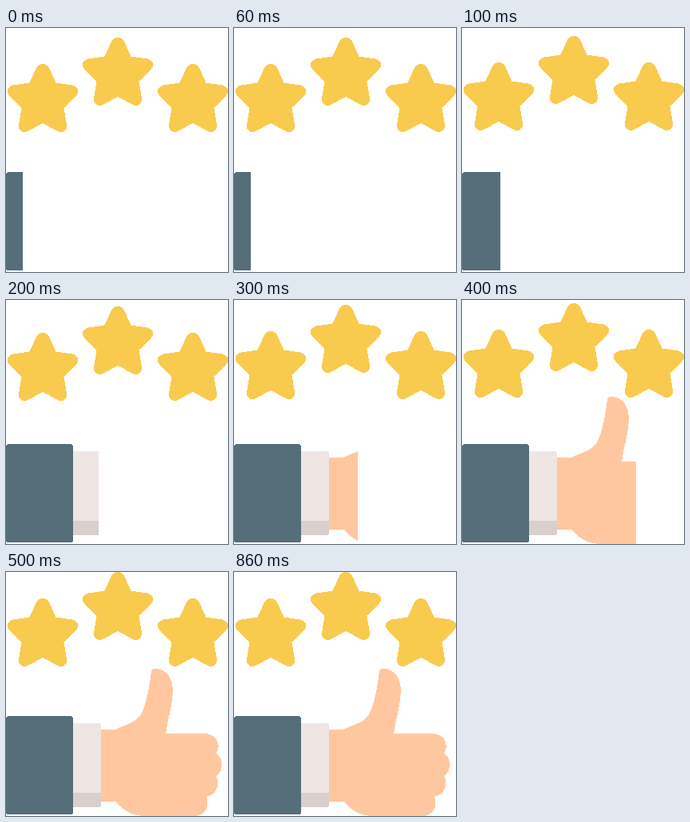
Recreate the animation shown at these times as an HTML page. Size 278x305 px, loop 1.1 s.

```html
<!DOCTYPE html>
<html lang="en">
<head>
<meta charset="utf-8">
<title>Three stars, thumbs up</title>
<style>
  html, body {
    margin: 0;
    width: 100%;
    height: 100%;
    overflow: hidden;
    background: #fff;
  }

  svg {
    position: absolute;
    left: 0;
    top: 0;
    width: 278px;
    height: 305px;
    overflow: hidden;
    shape-rendering: crispEdges;
  }

  .stars {
    fill: #f8cb4f;
    animation: rise 1100ms step-end infinite;
  }

  .arm {
    animation: reveal 1100ms step-end infinite;
  }

  .sleeve { fill: #556e7a; }
  .cuff   { fill: #efe6e3; }
  .shade  { fill: #d9cfcd; }
  .hand   { fill: #ffc7a0; }

  /* Both moves advance in 100 ms steps, then rest for 600 ms. */
  @keyframes rise {
    0%       { transform: translateY(12px); }
    9.0909%  { transform: translateY(10px); }
    18.1818% { transform: translateY(8px); }
    27.2727% { transform: translateY(6px); }
    36.3636% { transform: translateY(4px); }
    45.4545%, 100% { transform: translateY(0); }
  }

  @keyframes reveal {
    0%       { clip-path: inset(0 257px 0 0); }
    9.0909%  { clip-path: inset(0 230px 0 0); }
    18.1818% { clip-path: inset(0 162px 0 0); }
    27.2727% { clip-path: inset(0 123px 0 0); }
    36.3636% { clip-path: inset(0 60px 0 0); }
    45.4545%, 100% { clip-path: inset(0); }
  }
</style>
</head>
<body>
<svg viewBox="0 0 278 305">
  <defs>
    <path id="star" d="M0 0C4 0 6.5 2 8 5L16.5 23.5L37 26.5C44 27.5 46.5 35 41.5 40L26.5 54.5L30 76C31 83 25 87 19 84L0 74
      L-19 84C-25 87 -31 83 -30 76L-26.5 54.5L-41.5 40C-46.5 35 -44 27.5 -37 26.5L-16.5 23.5L-8 5C-6.5 2 -4 0 0 0Z"/>
  </defs>
  <g class="stars">
    <use href="#star" x="46" y="33"/>
    <use href="#star" x="140" y="0"/>
    <use href="#star" x="234" y="33"/>
  </g>
</svg>

<svg class="arm" viewBox="0 0 278 305">
  <path class="hand" d="M118 197H137C144 193 157 190 164 184C174 176 178 152 182 125Q182 121 187 121
    C201 121 209 133 209 149C209 164 202 186 200 202H249
    C263 202 270 216 263 227C272 231 273 249 263 255C268 264 265 278 251 281C255 292 250 305 236 305
    H176C153 305 146 295 137 287H118Z"/>
  <path class="cuff" d="M83 189H116Q119 189 119 192V276H83Z"/>
  <path class="shade" d="M83 275.5H119V291Q119 294 116 294H83Z"/>
  <rect class="sleeve" y="180" width="84" height="123" rx="3.5"/>
</svg>
</body>
</html>
```
